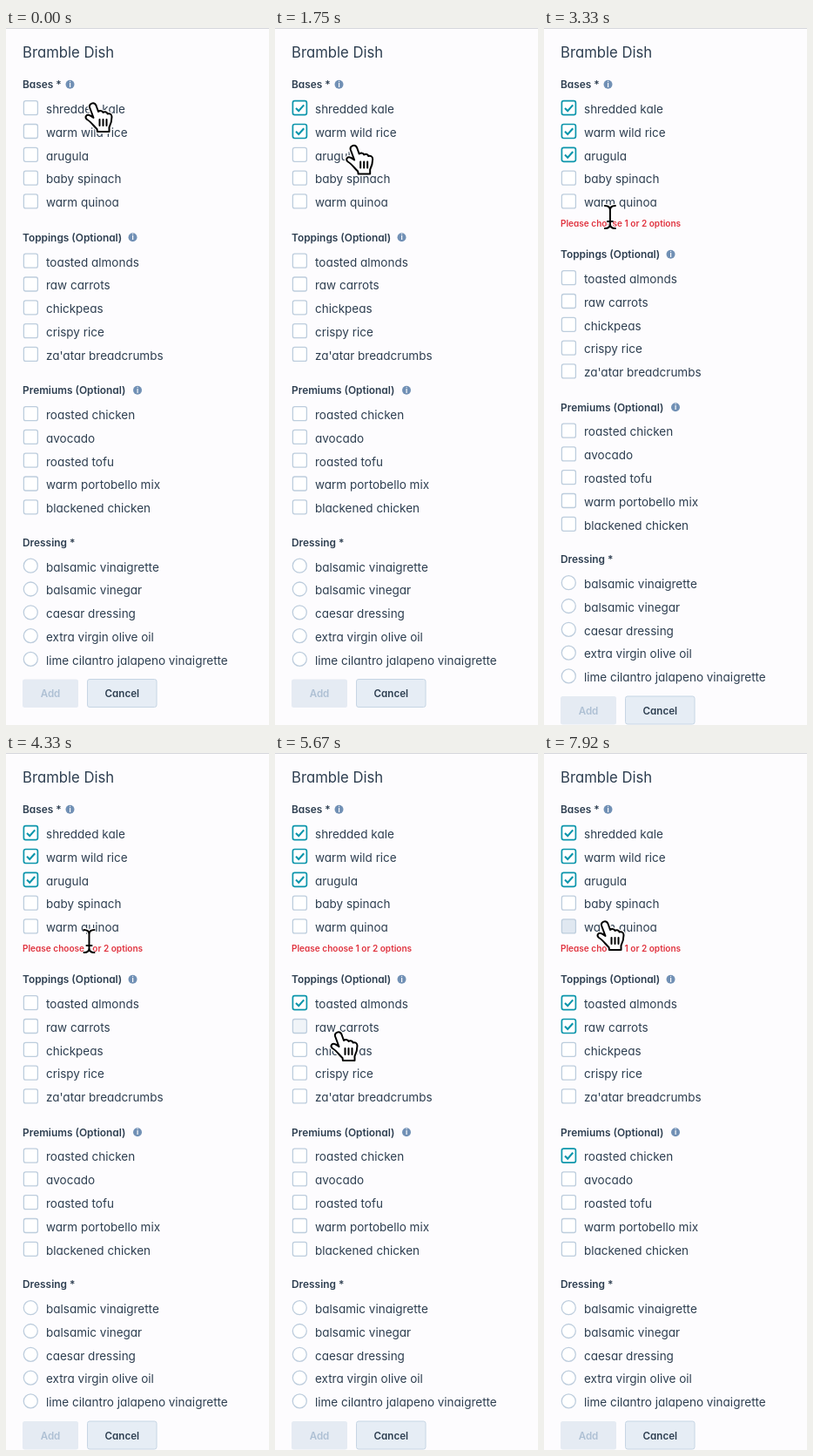
Write an HTML page that moves like this. It is 302 by 800 pixels and loops after 8 s.

```html
<!DOCTYPE html>
<html lang="en">
<head>
<meta charset="utf-8">
<title>Bowl order form</title>
<style>
  html, body { margin: 0; width: 100%; height: 100%; overflow: hidden; background: #fdfcfe; }
  svg { display: block; width: 302px; height: 800px; }
  text { font-family: Inter, "Open Sans", sans-serif; font-feature-settings: "cv11"; fill: #2d3e50; }
  .title { font-size: 16.7px; }
  .heading { font-size: 11.9px; font-weight: 600; }
  .label { font-size: 13.5px; }
  .button { font-size: 11.6px; font-weight: 600; text-anchor: middle; }
  .error { font-size: 10.05px; font-weight: 600; fill: #e0333f; }
  .info { font-size: 8px; font-weight: 700; fill: #fff; text-anchor: middle; }
  .box { stroke: #bdcddd; stroke-width: 1.3; }
  .tick { fill: none; stroke: #0b95ab; stroke-width: 2.1; }
  .halo { stroke: #fff; stroke-width: 4.5; fill: none; }
  .ink { stroke: #000; stroke-width: 2; stroke-linejoin: round; stroke-linecap: round; }
</style>
</head>
<body>
<svg id="stage" viewBox="0 0 302 800"></svg>
<script>
const LOOP = 8000, PITCH = 26.8, SHIFT = 19.5, ERROR_AT = 2160;
const stage = document.getElementById('stage');

const sections = [
  { name: 'Bases *', y: 92, infoX: 73.5,
    items: ['shredded kale', 'warm wild rice', 'arugula', 'baby spinach', 'warm quinoa'] },
  { name: 'Toppings (Optional)', y: 267.5, infoX: 145.5,
    items: ['toasted almonds', 'raw carrots', 'chickpeas', 'crispy rice', "za'atar breadcrumbs"] },
  { name: 'Premiums (Optional)', y: 442.9, infoX: 151,
    items: ['roasted chicken', 'avocado', 'roasted tofu', 'warm portobello mix', 'blackened chicken'] },
  { name: 'Dressing *', y: 617.5, radio: true,
    items: ['balsamic vinaigrette', 'balsamic vinegar', 'caesar dressing',
            'extra virgin olive oil', 'lime cilantro jalapeno vinaigrette'] },
];

const checkedAt = {
  'shredded kale': 410, 'warm wild rice': 1410, 'arugula': ERROR_AT,
  'toasted almonds': 5160, 'raw carrots': 5910, 'roasted chicken': 6990,
};

// Pointer path: time, x, y
const path = [
  [0, 100, 88], [660, 101, 90], [1000, 100, 119], [1500, 100, 119], [1950, 84, 149],
  [2500, 84, 149], [3050, 40, 217], [3750, 140, 217], [4330, 95.5, 216], [4500, 88, 218],
  [4920, 76, 290], [5400, 76, 290], [5667, 73, 322], [6340, 73, 322], [6667, 67, 457],
  [7250, 67, 459], [7680, 70, 195], [8000, 70, 195],
];

function add(parent, tag, attrs = {}, content = '') {
  const el = document.createElementNS('http://www.w3.org/2000/svg', tag);
  for (const key in attrs) el.setAttribute(key, attrs[key]);
  el.textContent = content;
  return parent.appendChild(el);
}
const write = (parent, cls, x, y, content) => add(parent, 'text', { class: cls, x, y }, content);

add(stage, 'rect', { width: 302, height: 800, fill: '#fdfcfe' });
add(stage, 'rect', { width: 302, height: 1, fill: '#d5d7dc' });
write(stage, 'title', 19, 33.5, 'Bramble Dish');
const error = write(stage, 'error', 19, 227.5, 'Please choose 1 or 2 options');
const lower = add(stage, 'g');

const rows = [];
sections.forEach((section, index) => {
  const group = index ? lower : stage;
  write(group, 'heading', 19, section.y - 22.8, section.name);
  if (section.infoX) {
    add(group, 'circle', { cx: section.infoX, cy: section.y - 27.2, r: 5, fill: '#7190b5' });
    write(group, 'info', section.infoX, section.y - 24.2, 'i');
  }
  section.items.forEach((name, i) => {
    const y = section.y + i * PITCH;
    const box = section.radio
      ? add(group, 'circle', { class: 'box', cx: 28.3, cy: y - .3, r: 8 })
      : add(group, 'rect', { class: 'box', x: 20.4, y: y - 8.3, width: 16, height: 16, rx: 2.2 });
    const tick = add(group, 'path', { class: 'tick', d: `M24 ${y}l3.2 3.2 6-6.8` });
    write(group, 'label', 46, y + 6, name);
    rows.push({ y, box, tick, lower: index > 0, checkedAt: checkedAt[name] ?? Infinity });
  });
});

add(lower, 'rect', { x: 19, y: 747.5, width: 64, height: 32.5, rx: 2.5, fill: '#e5ebf3' });
write(lower, 'button', 51, 768, 'Add').style.fill = '#aec0d4';
add(lower, 'rect', { x: 93.5, y: 747.5, width: 79.5, height: 32, rx: 2.5, fill: '#e6edf5', stroke: '#c6d5e4' });
write(lower, 'button', 133.3, 768, 'Cancel');

const handShape = 'M-4 3C-5-1 1-4 3.5 1L6 8C8 6.5 11 7 11.5 9C13.5 7.5 16.5 8.5 16.5 10.5' +
  'C19 9.5 21.5 11 21.5 14C21.5 20 20.5 22 18.5 26V31H5L4.5 28C1 25-2 20-7 17' +
  'C-10 14.5-8 11-4.5 12C-2.5 12.5-1 14 .5 15Z';
const beamShape = 'M-6-13C-2-13 0-11 0-8V8C0 11-2 13-6 13M6-13C2-13 0-11 0-8M6 13C2 13 0 11 0 8M-3 5H3';
const hand = add(stage, 'g'), beam = add(stage, 'g');
add(hand, 'path', { class: 'halo', d: handShape });
add(hand, 'path', { class: 'ink', d: handShape, fill: '#fff' });
add(hand, 'path', { class: 'ink', d: 'M7.5 17V24M11.5 17V24M15.5 17V24' });
add(beam, 'path', { class: 'halo', d: beamShape });
add(beam, 'path', { class: 'ink', d: beamShape, fill: 'none' });

function pointer(t) {
  const next = Math.max(1, path.findIndex(point => point[0] > t));
  const [t0, x0, y0] = path[next - 1], [t1, x1, y1] = path[next];
  const p = (t - t0) / (t1 - t0), ease = p * p * (3 - 2 * p);
  return { x: x0 + (x1 - x0) * ease, y: y0 + (y1 - y0) * ease };
}

function rowAt(t) {
  if (t < 0) return null;
  const { y } = pointer(t), shift = t >= ERROR_AT ? SHIFT : 0;
  return rows.find(row => Math.abs(row.y + (row.lower ? shift : 0) - y) < PITCH / 2);
}

const mix = (from, to, amount) =>
  `rgb(${from.map((value, i) => Math.round(value + (to[i] - value) * amount))})`;
const show = (el, visible) => el.setAttribute('visibility', visible ? 'visible' : 'hidden');

function draw(t) {
  // The tint fades in while the pointer rests on a row and clears when it leaves.
  const current = rowAt(t);
  const recent = [100, 150, 200, 250].map(lag => rowAt(t - lag));
  const tint = recent.filter(row => row === current).length / recent.length;
  for (const row of rows) {
    const checked = t >= row.checkedAt;
    const hover = row === current ? tint : 0;
    row.box.style.fill = mix([255, 255, 255], checked ? [202, 229, 236] : [224, 232, 241], hover);
    row.box.style.stroke = checked ? '#0b95ab' : '';
    row.box.style.strokeWidth = checked ? 1.7 : '';
    show(row.tick, checked);
  }
  const failed = t >= ERROR_AT;
  show(error, failed);
  lower.setAttribute('transform', `translate(0 ${failed ? SHIFT : 0})`);

  const { x, y } = pointer(t);
  for (const cursor of [hand, beam]) cursor.setAttribute('transform', `translate(${x} ${y})`);
  show(hand, current);
  show(beam, !current);
}

// Motion advances at 12 steps per second.
function tick(now) {
  draw(Math.floor((now % LOOP + 4) * .012) / .012 % LOOP);
  requestAnimationFrame(tick);
}
draw(0);
requestAnimationFrame(tick);
</script>
</body>
</html>
```
